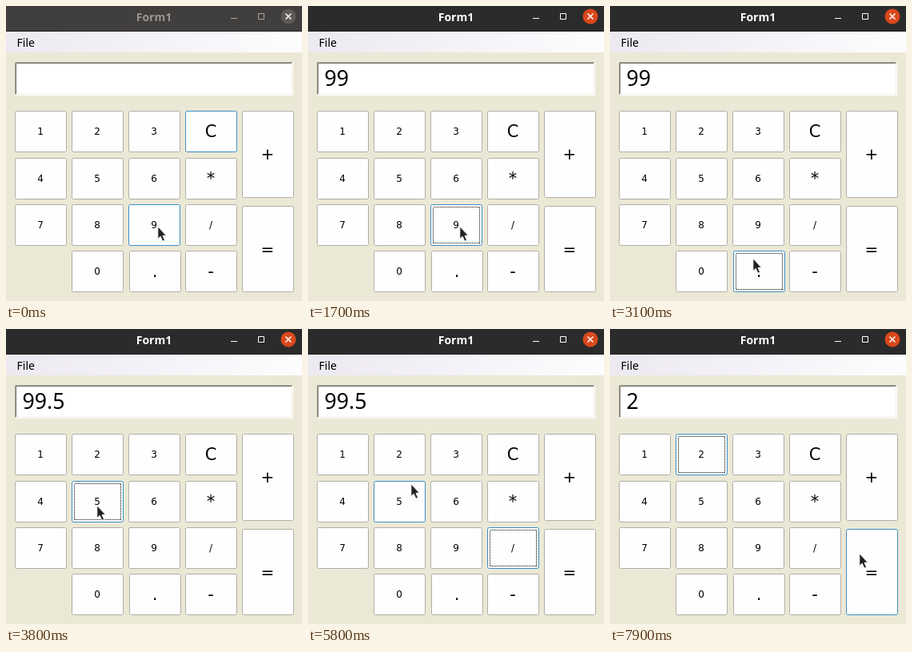
Recreate the animation shown at these times as an HTML page. Size 370 by 369 pixels, loop 8000 ms.

```html
<!DOCTYPE html>
<html lang="en">
<head>
<meta charset="utf-8">
<title>Calculator</title>
<style>
  html, body { margin: 0; width: 100%; height: 100%; overflow: hidden; background: #ebe8d6; }
  svg { display: block; width: 370px; height: 369px; }
  text { font-family: "DejaVu Sans", sans-serif; fill: #000; white-space: pre; }
  .bar { fill: #413e3e; }
  .title { font: bold 14px "Open Sans", "Noto Sans", sans-serif; fill: #989592; text-anchor: middle; }
  .menu { font: 14px "Noto Sans", sans-serif; }
  .control { fill: none; stroke: #aaa7a4; }
  .close { fill: #5c5957; }
  .cross { fill: none; stroke: #fff; stroke-width: 1.5; }
  .active .bar { fill: #2c2b2c; }
  .active .title { fill: #fff; }
  .active .control { stroke: #fff; }
  .active .close { fill: #d9481c; }
  .display { font: 26.67px "Noto Sans", sans-serif; }
  .key text { text-anchor: middle; }
  .face { fill: #fefefe; stroke: #b0aea7; }
  .ring { fill: none; stroke: #000; stroke-dasharray: 1 1; shape-rendering: crispEdges; visibility: hidden; }
  .lit .face { stroke: #3c8fc6; }
  .down .face { fill: #2779ff; stroke: #2779ff; }
  .focus .ring, .down .ring { visibility: visible; }
</style>
</head>
<body>
<svg id="app" viewBox="0 0 370 369">
  <defs>
    <linearGradient id="sheen">
      <stop offset="0" stop-color="#ece9f0"/>
      <stop offset="1" stop-color="#fdfcfe"/>
    </linearGradient>
  </defs>
  <rect width="370" height="369" fill="#ebe8d6"/>
  <rect class="bar" width="370" height="32"/>
  <rect y="31" width="370" height="1" fill="#211e20"/>
  <text class="title" x="185" y="19">Form1</text>
  <path class="control" d="M281 15.5h8M315.500 9.500h7v7h-7z"/>
  <circle class="close" cx="353" cy="13" r="9.500"/>
  <path class="cross" d="M349.500 9.500l7 7m0-7l-7 7"/>
  <rect y="32" width="370" height="26" fill="url(#sheen)"/>
  <text class="menu" x="13.500" y="51">File</text>

  <rect x="11" y="70" width="348" height="42" fill="#fff"/>
  <path d="M11.500 111V70.500H358" fill="none" stroke="#aaa799"/>
  <path d="M12.500 110V71.500H357" fill="none" stroke="#716f66"/>
  <path d="M357.500 72V110.500H13" fill="none" stroke="#efedE2"/>
  <text class="display" id="display" x="20.500" y="100"></text>

  <g id="keys"></g>
  <path id="cursor" d="M.8 .8V16.500L4.200 13.300L6.800 19.300L9.600 18.100L7 12.300H11.500Z"
        fill="#222" stroke="#fff" stroke-width="1"/>
</svg>
<script>
const LOOP = 8000;
const NS = 'http://www.w3.org/2000/svg';
const $ = id => document.getElementById(id);
const app = $('app'), display = $('display'), cursor = $('cursor');

function add(parent, tag, attrs) {
  const el = document.createElementNS(NS, tag);
  for (const name in attrs) el.setAttribute(name, attrs[name]);
  return parent.appendChild(el);
}

function makeKey(label, x, y, h, size) {
  const w = 65;
  const el = add($('keys'), 'g', { class: 'key' });
  add(el, 'rect', { class: 'face', x: x + .5, y: y + .5, width: w - 1, height: h - 1, rx: 2 });
  add(el, 'rect', { class: 'ring', x: x + 3.5, y: y + 3.5, width: w - 7, height: h - 7 });
  add(el, 'text', {
    x: x + w / 2 - .5, y: Math.round(y + h / 2 + size * .346), 'font-size': size
  }).textContent = label;
  return { label, el, hit: (px, py) => px >= x && px < x + w && py >= y && py < y + h };
}

const keys = [];
const rowTops = [131, 190, 248, 306];
['123C', '456*', '789/', ' 0.-'].forEach((row, r) => {
  [...row].forEach((label, c) => {
    if (label === ' ') return;
    const x = 11 + 71 * c + (label === '.' ? 1 : 0);
    keys.push(makeKey(label, x, rowTops[r], 52, 'C*.-'.includes(label) ? 21 : 12));
  });
});
keys.push(makeKey('+', 295, 131, 109, 20), makeKey('=', 295, 250, 108, 20));

// Pointer positions: time, x, y
const moves = [
  [0, 189, 275],
  [2100, 189, 284], [2200, 188, 310], [2300, 187, 328],
  [3100, 178, 315], [3200, 140, 262], [3300, 113, 220],
  [4500, 122, 224], [4600, 151, 238], [4700, 204, 263], [4800, 242, 281], [4900, 256, 288],
  [5600, 238, 275], [5700, 182, 232], [5800, 128, 193], [5900, 121, 175], [6000, 118, 168],
  [7600, 170, 199], [7700, 252, 252], [7900, 311, 280]
];
// Key presses: time down, time up, key, text shown after release
const presses = [
  [900, 1100, '9', '9'],
  [1600, 1700, '9', '99'],
  [2600, 2700, '.', '99'],
  [3700, 3800, '5', '99.5'],
  [5100, 5300, '/', '99.5'],
  [6300, 6500, '2', '2']
];

function draw(t) {
  const [, x, y] = moves.findLast(m => m[0] <= t);
  const press = presses.findLast(p => p[0] <= t);
  const done = presses.findLast(p => p[1] <= t);
  const held = press && t < press[1];

  app.classList.toggle('active', !!press);
  display.textContent = done ? done[3] : '';
  cursor.setAttribute('transform', `translate(${x} ${y})`);
  for (const { label, el, hit } of keys) {
    const focused = label === (press ? press[2] : 'C');
    el.classList.toggle('lit', focused || hit(x + 1, y + 1));
    el.classList.toggle('focus', focused && !!press);
    el.classList.toggle('down', focused && !!held);
  }
}

const start = performance.now();
function tick() {
  draw((performance.now() - start) % LOOP);
  requestAnimationFrame(tick);
}
tick();
</script>
</body>
</html>
```
